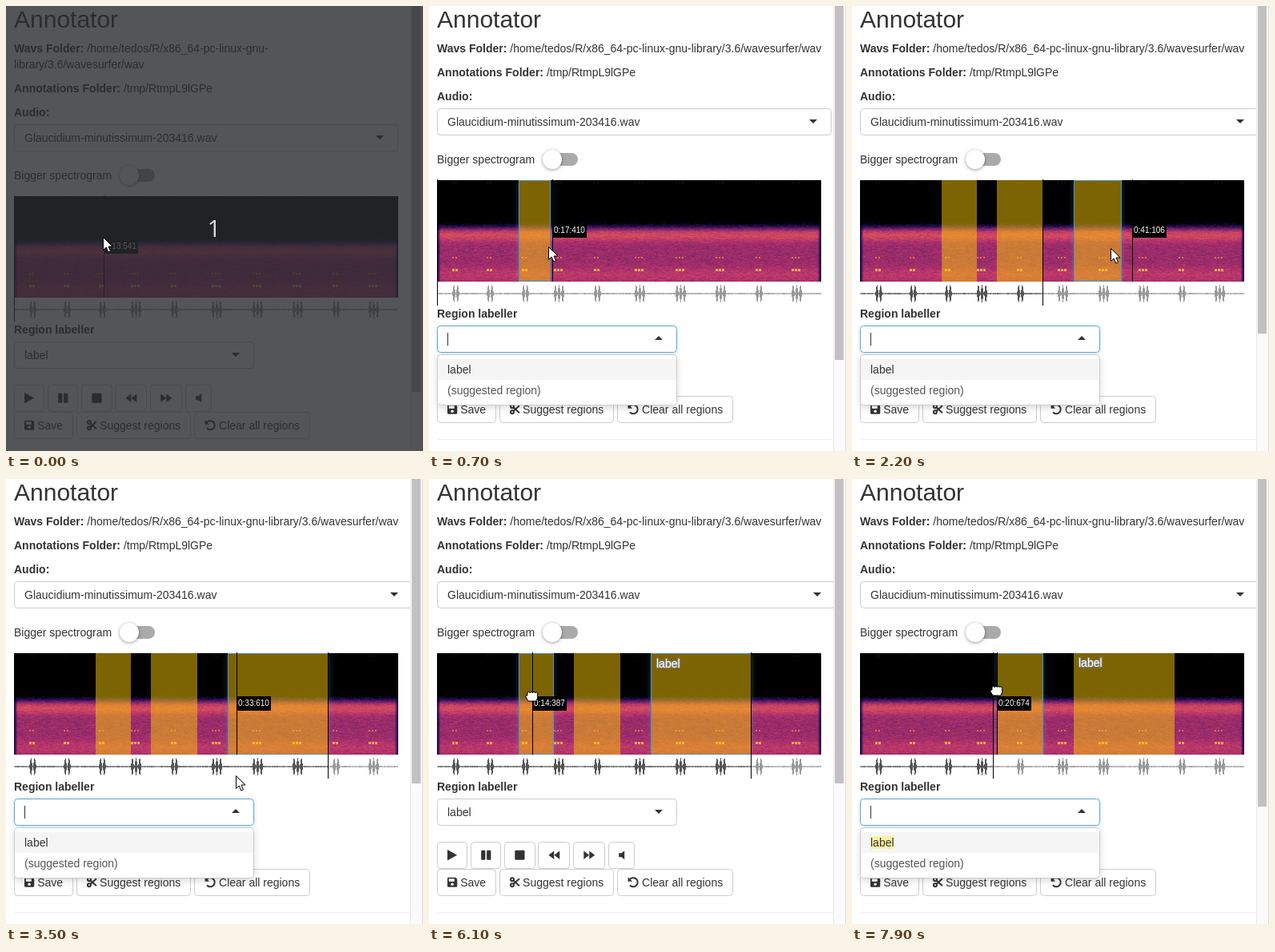
Write an HTML page with a canvas that moves like this. It is 521x557 px and loops after 8 s.

```html
<!DOCTYPE html>
<html lang="en">
<head>
<meta charset="utf-8">
<title>Annotator</title>
<style>
  html, body { margin: 0; width: 100%; height: 100%; overflow: hidden; background: #fff; }
  canvas { display: block; }
</style>
</head>
<body>
<canvas id="stage" width="521" height="557"></canvas>
<script>
const W = 521, H = 557, LOOP = 8000, STEP = 100;
const ctx = document.getElementById('stage').getContext('2d');
const FONT = '"Liberation Sans", Arial, sans-serif';
const INK = '#333';
const SPEC = { x: 10, y: 218, w: 480, h: 127 };
const SEC_PER_PX = 0.1209;
const SPACE = 3.89;

// Centres of the recorded calls; each has two or three notes
const CALLS = [33, 76, 120, 162, 210, 263, 314, 364, 412, 459]
  .map((x, i) => ({ x, notes: i > 2 && i % 4 ? 3 : 2 }));

// Pointer moves: from, until, x, y
const START = { x: 122, y: 289 };
const MOVES = [
  [0, 300, 113, 292], [300, 800, 159, 303], [1100, 1400, 182, 306], [1400, 1850, 240, 308],
  [1900, 2040, 277, 305], [2040, 2330, 404, 300], [2330, 2900, 424, 318], [2900, 3050, 288, 371],
  [5100, 5150, 198, 308], [5200, 5700, 129, 292], [5800, 6050, 129, 272], [6300, 6500, 181, 265],
  [6900, 7500, 224, 268], [7800, 7850, 181, 265]
];
const POINTER_LAG = 40, DRAG_LAG = 20;

const REGIONS = [
  { x: 112, end: 156, press: 300, release: 900, gone: 6300 },
  { x: 181, end: 239, press: 1400, release: 1850, gone: LOOP },
  { x: 277, end: 403, press: 2040, release: 2330, gone: LOOP }
];
const MENU_DELAY = 150, SAVE_DELAY = 300;
const TYPE_AT = 3900, ENTER_AT = 4500, REOPEN_AT = 6500, PICK_AT = 7300, LAST_OPEN_AT = 7700;

const clamp01 = v => Math.max(0, Math.min(1, v));
const smooth = u => (u = clamp01(u)) * u * (3 - 2 * u);
const mix = (a, b, f) => a + (b - a) * f;
const bump = (x, mid, width) => Math.exp(-(((x - mid) / width) ** 2));

function randomizer(seed) {
  return () => (seed = (seed * 16807) % 2147483647) / 2147483647;
}

function pathAt(t) {
  let { x, y } = START;
  for (const [from, until, toX, toY] of MOVES) {
    const f = smooth((t - from) / (until - from));
    x = mix(x, toX, f);
    y = mix(y, toY, f);
  }
  return { x: Math.round(x), y: Math.round(y) };
}

function stateAt(t) {
  const regions = REGIONS.filter(r => t >= r.press && t < r.gone);
  const saved = regions.filter(r => t >= r.press + SAVE_DELAY).length;
  const latest = REGIONS.filter(r => t >= r.press).pop();
  const done = REGIONS.filter(r => t >= r.release).pop();
  const typing = t >= TYPE_AT && t < ENTER_AT;
  return {
    regions, saved,
    selected: t >= PICK_AT ? REGIONS[1] : t < REGIONS[0].gone ? latest : null,
    head: t >= REOPEN_AT ? 176 : done ? done.end - 1 : SPEC.x,
    open: t < ENTER_AT ? !!latest && t >= latest.press + MENU_DELAY
      : t >= LAST_OPEN_AT || (t >= REOPEN_AT && t < PICK_AT),
    typed: typing ? 'label'.slice(0, 1 + (t - TYPE_AT) / STEP) : '',
    labelled: t >= ENTER_AT,
    wrapped: t < REGIONS[0].press + SAVE_DELAY,
    right: [490, 503, 508, 508][saved]
  };
}

function heat(v) {
  const ramp = [[0, 0, 0, 0], [.2, 50, 18, 95], [.5, 185, 52, 108], [.7, 235, 105, 75], [1, 252, 205, 80]];
  const i = Math.max(1, ramp.findIndex(s => v <= s[0]));
  const a = ramp[i - 1], b = ramp[i], f = (v - a[0]) / (b[0] - a[0]);
  return [1, 2, 3].map(k => mix(a[k], b[k], f));
}

function buildSpectrogram() {
  const c = document.createElement('canvas');
  c.width = SPEC.w; c.height = SPEC.h;
  const g = c.getContext('2d'), rnd = randomizer(77);
  for (let y = 52; y < SPEC.h; y++) {
    const level = smooth((y - 52) / 13) * (.43 + .15 * bump(y, 69, 7) + .08 * bump(y, 118, 9));
    let noise = 0;
    for (let x = 0; x < SPEC.w; x++) {
      const edge = clamp01((Math.min(x, SPEC.w - 1 - x) + 1) / 5);
      noise = noise * .5 + (rnd() - .5) * .08;
      g.fillStyle = `rgb(${heat(clamp01((level + noise) * edge))})`;
      g.fillRect(x, y, 1, 1);
    }
  }
  for (const { x, notes } of CALLS) for (let i = 0; i < notes; i++) {
    const left = Math.round(x - SPEC.x - notes * 2 + i * 4);
    g.fillStyle = '#f9ac45'; g.fillRect(left, 111, 3, 3);
    g.fillStyle = '#e0705a'; g.fillRect(left, 96, 2, 2);
    g.fillStyle = '#1e0c38'; g.fillRect(left, 3, 2, 1);
  }
  return c;
}
const spectrogram = buildSpectrogram();

function text(s, x, y, o = {}) {
  ctx.font = `${o.bold ? 'bold ' : ''}${o.size || 14}px ${FONT}`;
  ctx.fillStyle = o.color || INK;
  ctx.fillText(s, x, y);
  return x + ctx.measureText(s).width;
}

function field(name, value, y) {
  text(value, text(name + ' ', 10, y, { bold: true }), y);
}

function rect(x, y, w, h, color) {
  ctx.fillStyle = color;
  ctx.fillRect(x, y, w, h);
}

function disc(x, y, r, color) {
  ctx.beginPath();
  ctx.arc(x, y, r, 0, 7);
  ctx.fillStyle = color;
  ctx.fill();
}

function box(x, y, w, h, r, fill, stroke) {
  const inset = stroke ? .5 : 0;
  ctx.beginPath();
  ctx.roundRect(x + inset, y + inset, w - 2 * inset, h - 2 * inset, r);
  if (fill) { ctx.fillStyle = fill; ctx.fill(); }
  if (stroke) { ctx.strokeStyle = stroke; ctx.lineWidth = 1; ctx.stroke(); }
}

function glow(color, blur, dy, paint) {
  ctx.save();
  ctx.shadowColor = color; ctx.shadowBlur = blur; ctx.shadowOffsetY = dy;
  paint();
  ctx.restore();
}

function poly(...pts) {
  ctx.beginPath();
  for (let i = 0; i < pts.length; i += 2) ctx.lineTo(pts[i], pts[i + 1]);
  ctx.closePath();
  ctx.fillStyle = INK;
  ctx.fill();
}

function arrow(x, y, up) {
  if (up) poly(x - 5, y + 5, x + 5, y + 5, x, y);
  else poly(x - 5, y, x + 5, y, x, y + 5);
}

// Icons start at x = 0 and are centred on y = 0
const ICONS = {
  play: { w: 12.25, paint: () => poly(0, -6.8, 12.2, 0, 0, 6.8) },
  pause: { w: 12.25, paint: () => [0, 7].forEach(x => box(x, -6.1, 5.25, 12.2, 1.3, INK)) },
  stop: { w: 12.25, paint: () => box(0, -6.1, 12.25, 12.2, 1.3, INK) },
  back: { w: 14, paint: () => [0, 7].forEach(x => poly(x, 0, x + 6.8, -5.2, x + 6.8, 5.2)) },
  ahead: { w: 14, paint: () => [0, 7].forEach(x => poly(x, -5.2, x + 6.8, 0, x, 5.2)) },
  mute: { w: 7, paint: () => poly(0, -2.6, 3.4, -2.6, 7, -5.6, 7, 5.6, 3.4, 2.6, 0, 2.6) },
  save: { w: 12.25, paint: () => {
    box(0, -6.1, 12.25, 12.2, [1.3, 3.5, 1.3, 1.3], INK);
    rect(1.8, -4.4, 7, 3.5, '#fff');
    disc(6.1, 2.6, 1.75, '#fff');
  } },
  cut: { w: 12.25, paint: () => {
    ctx.strokeStyle = INK; ctx.lineWidth = 2;
    for (const s of [-1, 1]) {
      ctx.beginPath(); ctx.arc(3, 3.5 * s, 2, 0, 7); ctx.stroke();
      ctx.beginPath(); ctx.moveTo(4.5, 2.2 * s); ctx.lineTo(12, -4.5 * s); ctx.stroke();
    }
  } },
  undo: { w: 14, paint: () => {
    ctx.strokeStyle = INK; ctx.lineWidth = 2;
    ctx.beginPath(); ctx.arc(7, 0, 5.6, -2.8, 2.4); ctx.stroke();
    poly(.4, -6.6, .4, -.9, 6, -.9);
  } }
};

function buttonRow(y, items) {
  let x = 10;
  for (const [name, label] of items) {
    const icon = ICONS[name];
    ctx.font = `14px ${FONT}`;
    const w = 26 + icon.w + (label ? SPACE + ctx.measureText(label).width : 0);
    const left = Math.round(x);
    box(left, y, Math.round(x + w) - left, 34, 4, '#fff', '#ccc');
    ctx.save();
    ctx.translate(x + 13, y + 16.75);
    icon.paint();
    ctx.restore();
    if (label) text(label, x + 13 + icon.w + SPACE, y + 22);
    x += w + SPACE;
  }
}

function drawForm(right) {
  field('Annotations Folder:', '/tmp/RtmpL9lGPe', 88);
  text('Audio:', 10, 118, { bold: true });
  box(10, 128, right - 10, 34, 4, '#fff', '#ccc');
  text('Glaucidium-minutissimum-203416.wav', 23, 150);
  arrow(right - 23, 142);
  text('Bigger spectrogram', 10, 197);
  box(146, 184, 40, 16, 8, '#aaa');
  glow('rgba(0,0,0,.4)', 4, 1, () => disc(154, 192, 12, '#fff'));
  text('Region labeller', 10, 390, { bold: true });
  rect(10, 542, right - 10, 1, '#eee');
  buttonRow(454, [['play'], ['pause'], ['stop'], ['back'], ['ahead'], ['mute']]);
  buttonRow(488, [['save', 'Save'], ['cut', 'Suggest regions'], ['undo', 'Clear all regions']]);
}

function drawWave(head) {
  const rnd = randomizer(9);
  for (let x = SPEC.x; x < SPEC.x + SPEC.w; x++) {
    let a = .5 + rnd() * .4;
    for (const call of CALLS) for (let i = 0; i < call.notes; i++) {
      const mid = call.x + (i - (call.notes - 1) / 2) * 4.6;
      a = Math.max(a, 11 * bump(x, mid, 1.4));
    }
    rect(x, 360 - a, 1, a * 2, x < head ? '#555' : '#999');
  }
}

function drawRegion(r, end, lit, label) {
  const w = end - r.x, { y, h } = SPEC;
  if (lit) {
    ctx.save();
    ctx.beginPath();
    ctx.rect(0, y, W, h); ctx.rect(r.x, y, w, h);
    ctx.clip('evenodd');
    glow('rgba(82,168,236,.35)', 7, 0, () => rect(r.x, y, w, h, '#52a8ec'));
    ctx.restore();
  }
  rect(r.x, y, w, h, 'rgba(250,200,4,.5)');
  if (lit) box(r.x, y, w, h, 0, null, '#5594b5');
  if (label) {
    const x = r.x + (lit ? 7 : 6), base = lit ? 236 : 235;
    ctx.font = `14px ${FONT}`;
    ctx.strokeStyle = '#888'; ctx.lineWidth = 2; ctx.lineJoin = 'round';
    ctx.strokeText(label, x, base);
    text(label, x, base, { color: '#fff' });
  }
}

function drawHover(x) {
  rect(x, 217, 1, 128, '#000');
  rect(x, 272, 43, 18, '#000');
  const [sec, ms] = ((x - SPEC.x) * SEC_PER_PX).toFixed(3).split('.');
  text(`0:${sec.padStart(2, '0')}:${ms}`, x + 2, 284, { size: 10, color: '#fff' });
}

function drawLabeller({ open, typed }, t) {
  if (!open) {
    box(10, 400, 300, 34, 4, '#fff', '#ccc');
    text('label', 23, 422);
    arrow(287, 414);
    return;
  }
  glow('rgba(102,175,233,.4)', 5, 0, () => box(10, 400, 300, 34, 4, '#fff'));
  box(10, 400, 300, 34, 4, '#fff', '#66a8cc');
  arrow(287, 413, true);
  rect(Math.round(text(typed, 23, 422)), 409, 1, 16, INK);

  const whole = typed === 'label', h = whole ? 38 : 64;
  glow('rgba(0,0,0,.15)', 8, 3, () => box(10, 436, 300, h, 4, '#fff'));
  box(10, 436, 300, h, 4, '#fff', '#ccc');
  rect(11, 442, 298, 26, '#f5f5f5');
  ctx.font = `14px ${FONT}`;
  const mark = t >= REOPEN_AT ? 'label' : typed;
  rect(23, 447, ctx.measureText(mark).width, 16, 'rgba(255,237,40,.4)');
  text('label', 23, 460);
  if (!typed) text('(suggested region)', 23, 486, { color: '#555' });
  else if (!whole) text(typed + '…', text('Add ', 23, 486, { color: '#777' }), 486, { bold: true, color: '#777' });
}

function drawScrollbar(saved) {
  rect(505, 0, 16, H, '#fbfbfb');
  rect(505, 0, 1, H, '#e8e8e8');
  rect(520, 0, 1, H, '#ddd');
  rect(507, 0, 11, Math.round(H * H / (643 + 57 * saved)), '#c1c1c1');
}

function drawPointer(x, y, hand) {
  ctx.save();
  ctx.translate(x, y);
  ctx.lineWidth = 1; ctx.lineJoin = 'round';
  ctx.strokeStyle = '#000'; ctx.fillStyle = '#fff';
  const shape = new Path2D(hand
    ? 'M-5-4a1.6 1.6 0 0 1 3.2 0a1.6 1.6 0 0 1 3.2 0a1.6 1.6 0 0 1 3.2 0a1.6 1.6 0 0 1 3 0V2L6 6H-4L-7 1V-1H-5Z'
    : 'M.5.5V16.5L4.2 13L6.8 19L9.5 17.8L7 12H12Z');
  ctx.fill(shape);
  ctx.stroke(shape);
  ctx.restore();
}

function drawCountdown() {
  rect(0, 0, W, H, 'rgba(40,43,48,.8)');
  ctx.font = '30px "Open Sans", "Noto Sans", sans-serif';
  ctx.textAlign = 'center';
  ctx.fillStyle = '#ddd';
  ctx.fillText('1', 260, 289);
  ctx.textAlign = 'left';
}

function draw(t) {
  const s = stateAt(t);
  const hover = pathAt(t).x, pointer = pathAt(t - POINTER_LAG);

  rect(0, 0, W, H, '#fff');
  text('Annotator', 10, 27, { size: 30 });
  const path = ['/home/tedos/R/x86_64-pc-linux-gnu-', 'library/3.6/wavesurfer/wav'];
  field('Wavs Folder:', s.wrapped ? path[0] : path.join(''), 58);
  if (s.wrapped) text(path[1], 10, 78);

  ctx.save();
  ctx.translate(0, s.wrapped ? 20 : 0);
  drawForm(s.right);
  drawWave(s.head);
  rect(SPEC.x, SPEC.y, SPEC.w, SPEC.h, '#000');
  ctx.drawImage(spectrogram, SPEC.x, SPEC.y);
  let hand = false;
  for (const r of s.regions) {
    const dragged = t < r.release;
    const end = dragged ? Math.max(r.x + 1, Math.min(r.end, pathAt(t - DRAG_LAG).x)) : r.end;
    const over = !dragged && pointer.y < 345 && hover >= r.x && hover <= end;
    hand = hand || over;
    drawRegion(r, end, over || r === s.selected, s.labelled && r === REGIONS[2] ? 'label' : '');
  }
  rect(s.head, 217, 1, 158, '#000');
  drawHover(hover);
  drawLabeller(s, t);
  ctx.restore();

  drawScrollbar(s.saved);
  if (t < STEP) drawCountdown();
  drawPointer(pointer.x - 1, pointer.y, hand);
}

function tick(now) {
  draw(Math.floor(now % LOOP / STEP) * STEP);
  requestAnimationFrame(tick);
}
requestAnimationFrame(tick);
</script>
</body>
</html>
```
